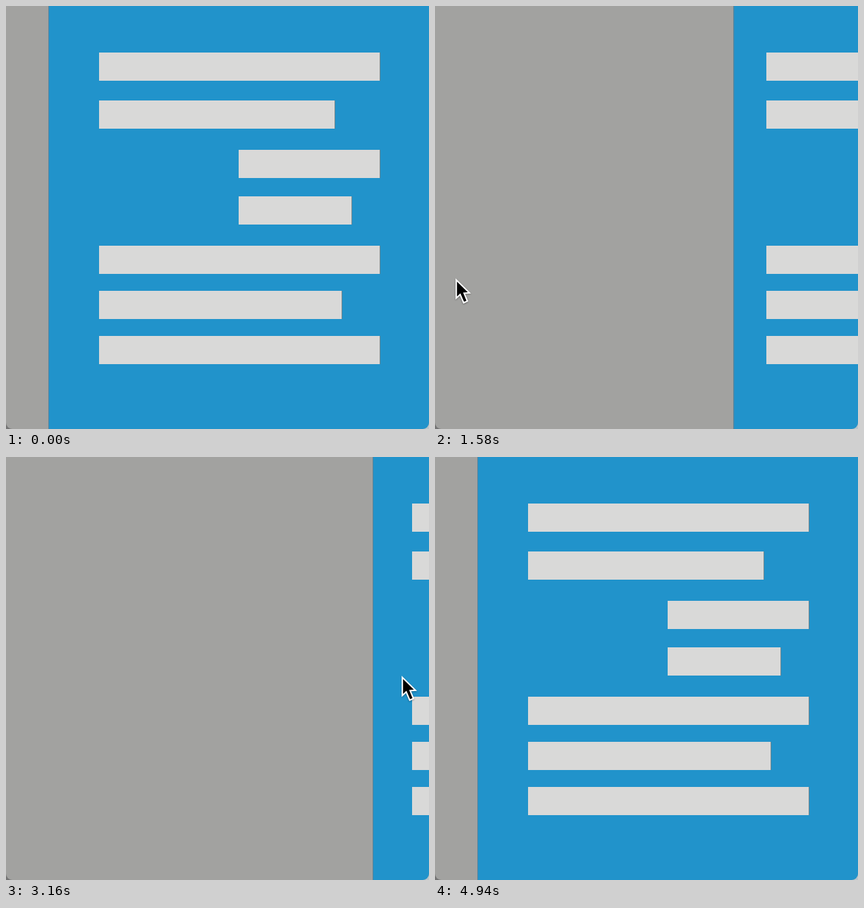
An HTML page for the animation above (5580 ms loop, 600 by 600 pixels).

```html
<!DOCTYPE html>
<html lang="en">
<head>
<meta charset="utf-8">
<title>Sliding panel</title>
<style>
  html, body {
    margin: 0;
    width: 100%;
    height: 100%;
    overflow: hidden;
    background: linear-gradient(90deg, #747474 50%, #b9c4ca 50%);
  }
  .stage {
    position: relative;
    width: 600px;
    height: 600px;
    overflow: hidden;
    border-radius: 0 0 9px 9px;
    background: #a2a2a0;
  }
  .panel, .lines, .cursor {
    position: absolute;
    left: 0;
    top: 0;
    animation: 5580ms ease infinite;
  }
  .panel {
    box-sizing: border-box;
    width: 600px;
    height: 600px;
    border-left: 1px solid #5d8499;
    background: #2193cb;
    animation-name: panel;
  }
  .lines { animation-name: lines; }
  .lines i {
    position: absolute;
    left: 132px;
    width: 398px;
    height: 40px;
    background: #d9d9d8;
    box-shadow: 1px 0 #6f8790;
  }
  .lines .inset { left: 330px; }
  .cursor {
    overflow: visible;
    filter: drop-shadow(0 1px 1px rgba(0, 0, 0, .35));
    animation-name: cursor;
  }

  /* Left edge: rest, hover, open, hover while open, rest */
  @keyframes panel {
    0%, 9.552% { transform: translateX(60px); }
    18.513%, 24.875% { transform: translateX(109px); }
    33.118%, 48.208% { transform: translateX(552px); }
    57.168%, 61.756% { transform: translateX(520px); }
    70.717%, 100% { transform: translateX(60px); }
  }
  @keyframes lines {
    0%, 24.875% { transform: translateX(0); }
    33.118%, 48.208% { transform: translateX(476px); }
    57.168%, 61.756% { transform: translateX(444px); }
    70.717%, 100% { transform: translateX(0); }
  }
  @keyframes cursor {
    0%, 9.05% { transform: translate(-30px, 398px); animation-timing-function: ease-out; }
    12.903% { transform: translate(29px, 386px); }
    32.079% { transform: translate(29px, 386px); animation-timing-function: cubic-bezier(.4, 0, .8, .7); }
    34.767% { transform: translate(107px, 371px); animation-timing-function: linear; }
    36.918% { transform: translate(203px, 353px); animation-timing-function: linear; }
    44.444% { transform: translate(501px, 314px); animation-timing-function: ease-out; }
    48.029% { transform: translate(561px, 310px); }
    82.437% { transform: translate(561px, 310px); animation-timing-function: ease-in-out; }
    88.53% { transform: translate(586px, -44px); animation-timing-function: step-start; }
    88.54%, 100% { transform: translate(-30px, 398px); }
  }
</style>
</head>
<body>
<div class="stage">
  <div class="panel"></div>
  <div class="lines">
    <i style="top:66px"></i>
    <i style="top:134px;width:334px"></i>
    <i class="inset" style="top:204px;width:200px"></i>
    <i class="inset" style="top:270px;width:160px"></i>
    <i style="top:340px"></i>
    <i style="top:404px;width:344px"></i>
    <i style="top:468px"></i>
  </div>
  <svg class="cursor" width="24" height="38">
    <path d="M2.2 5V26L7 21.5L12.2 33.5L15.6 32L10.8 20.5L17.5 20Z"
          stroke="#fff" stroke-width="4" paint-order="stroke"/>
  </svg>
</div>
</body>
</html>
```
